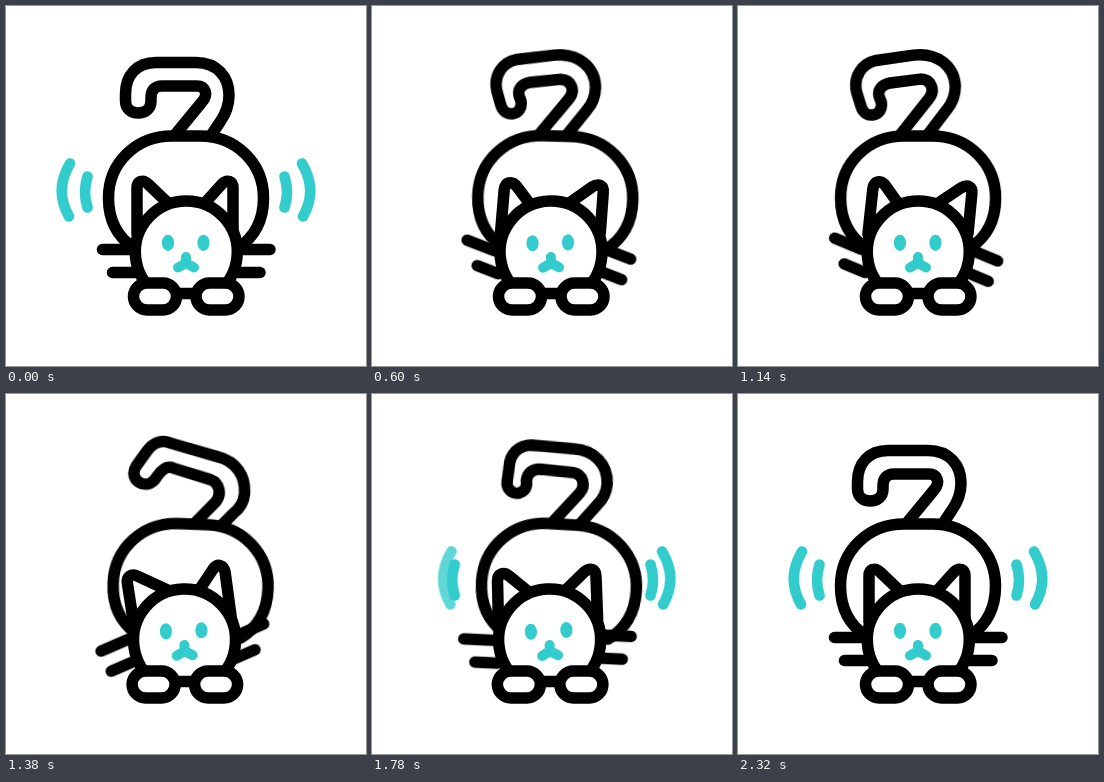
An HTML page without scripts that plays this animation: 360x360 px, repeating every 2.5 s.

```html
<!DOCTYPE html>
<html lang="en">
<head>
<meta charset="utf-8">
<title>Wiggling cat</title>
<style>
@property --sway { syntax: "<number>"; inherits: true; initial-value: 0; }

html, body { margin: 0; width: 100%; height: 100%; overflow: hidden; background: #fff; }
svg {
  display: block; width: 100%; height: 100%;
  fill: none; stroke: #000; stroke-width: 11.5; stroke-linecap: round; stroke-linejoin: round;
  animation: sway 2.5s ease-in-out infinite;
}

/* the rump swings, head and paws counter it */
.rump { transform-origin: 180px 312px; transform: rotate(calc(var(--sway) * 4.7deg)); }
.head { transform-origin: 180px 300px; transform: rotate(calc(var(--sway) * -4deg)); }
.paws { transform: translateX(calc(var(--sway) * -3px)); }
.solid { fill: #fff; }
.face { stroke: none; fill: #33cccc; }
.nose { stroke: #33cccc; stroke-width: 10; fill: none; }

@keyframes sway {
  0%, 7.2%, 92.8%, 100% { --sway: 0; }
  17.2%, 40%, 62.5%, 86% { --sway: -1; }
  28.6%, 51.2%, 74.4% { --sway: 1; }
}

/* tail and ears blend between neutral, back and forward shapes */
.bend { animation: bend 2.5s ease-in-out infinite; }
@keyframes bend {
  0%, 7.2%, 92.8%, 100% { d: var(--rest); }
  12.4%, 34.2%, 56%, 78.6% { d: var(--back); }
  23.2%, 45%, 65.6%, 88.6% { d: var(--fore); }
}
.tail {
  --rest: path("M168 130 L196 96 C203 88 199 80 191 80 L156 80 C149 80 145 84 145 92 L145 95 C145 111 119.5 111 119.5 95 L119.5 88 C119.5 69 131 56.5 150 56.5 L190 56.5 C211 56.5 223 71 223 89 C223 100 219 109 214 116 L206 128");
  --fore: path("M161 130 L191 92 C197 84 193 73 182 73 L152 77 C143 79 139 84 141 91 L143 96 C146 111 127 114 123 101 L118.5 87 C114.5 71 123 58 138 54.5 L175 49 C199 46 216 60 217 80 C217 90 214 97 209 103 L190 128");
  --back: path("M181 130 L202 107 C208 99 205 88 196 85 L159 75 C152 72 147 76 142 84 L140 87 C131 98 113 88 121 74 L131 59 C137 50 145 46 155 50 L203 62 C221 66 231 80 230.5 98 C230 107 226 113 220 118 L209 130");
}
.ear-l {
  --rest: path("M131 228 L131 182 C131 175 137 173 142 178 L164 199");
  --fore: path("M130 228 L135 183 C136 175 143 173 148 180 L162 200");
  --back: path("M130 228 L125 188 C124 181 129 177 136 181 L166 196");
}
.ear-r {
  --rest: path("M197 199 L216 178 C221 173 227 175 227 182 L227 228");
  --fore: path("M196 200 L223 182 C230 178 235 181 234 188 L230 228");
  --back: path("M194 200 L211 176 C216 170 222 172 223 180 L228 228");
}

.whiskers line { animation: flick 2.5s ease-in-out infinite; }
@keyframes flick {
  0%, 7.2%, 92.8%, 100% { transform: translateX(0) rotate(0); }
  12.4%, 34.2%, 56%, 78.6% { transform: translateX(-2px) rotate(-22deg); }
  23.2%, 45%, 65.6%, 88.6% { transform: translateX(-2px) rotate(23deg); }
}

/* motion arcs drift out, then pop back one after another; positive x is outward */
.arcs { stroke: #33cccc; stroke-width: 10.6; }
.arcs path { animation: 2.5s ease-out infinite; }
.arcs .in-r { animation-name: in-r; }
.arcs .out-r { animation-name: out-r; }
.arcs .in-l { animation-name: in-l; }
.arcs .out-l { animation-name: out-l; }
@keyframes in-r {
  0%, 7.2% { transform: none; opacity: 1; }
  20%, 62% { transform: translateX(21px); opacity: 0; }
  62.1% { transform: translateX(-6px); opacity: 0; }
  63.5% { opacity: 1; }
  64% { transform: translateX(2px); }
  70%, 100% { transform: none; opacity: 1; }
}
@keyframes out-r {
  0%, 7.2% { transform: none; opacity: 1; }
  20%, 66% { transform: translateX(21px); opacity: 0; }
  66.1% { transform: translateX(-20px); opacity: 0; }
  68.5% { opacity: 1; }
  76%, 100% { transform: none; opacity: 1; }
}
@keyframes in-l {
  0%, 7.2% { transform: none; opacity: 1; }
  20%, 67% { transform: translateX(21px); opacity: 0; }
  67.1% { transform: translateX(-6px); opacity: 0; }
  69% { opacity: 1; }
  74%, 100% { transform: none; opacity: 1; }
}
@keyframes out-l {
  0%, 7.2% { transform: none; opacity: 1; }
  20%, 70% { transform: translateX(21px); opacity: 0; }
  70.1% { transform: translateX(-20px); opacity: 0; }
  72% { opacity: 1; }
  78%, 100% { transform: none; opacity: 1; }
}
</style>
</head>
<body>
<svg viewBox="0 0 360 360">
  <g class="arcs">
    <path class="in-r" d="M278.5 170.5 Q283.5 186 278.5 201.5"/>
    <path class="out-r" d="M296 157.5 Q312 184.5 297 210.5"/>
    <g transform="matrix(-1 0 0 1 360 0)">
      <path class="in-l" d="M278.5 170.5 Q283.5 186 278.5 201.5"/>
      <path class="out-l" d="M296 157.5 Q312 184.5 297 210.5"/>
    </g>
  </g>

  <g class="rump">
    <path class="bend tail" d="M168 130"/>
    <path class="solid" d="M128 242 C110 230 102.5 212 102.5 192 C102.5 157 130 130 166 130 L194 130 C230 130 257.5 157 257.5 192 C257.5 212 250 230 232 242"/>
  </g>

  <g class="head">
    <g class="whiskers">
      <line x1="126" y1="243.5" x2="96.5" y2="243.5" style="transform-origin: 126px 243.5px"/>
      <line x1="129" y1="266.5" x2="106.5" y2="266.5" style="transform-origin: 129px 266.5px"/>
      <line x1="234" y1="243.5" x2="264" y2="243.5" style="transform-origin: 234px 243.5px"/>
      <line x1="231" y1="266.5" x2="254" y2="266.5" style="transform-origin: 231px 266.5px"/>
    </g>
    <path class="bend ear-l" d="M131 228"/>
    <path class="bend ear-r" d="M227 228"/>
    <path class="solid" d="M150 287 A51 51 0 1 1 210.6 287"/>
    <g class="face">
      <ellipse cx="162" cy="236.8" rx="6.1" ry="8.1"/>
      <ellipse cx="197.5" cy="236.8" rx="6.1" ry="8.1"/>
      <path class="nose" d="M180 251 V257 L172 261.5 M180 257 L188 261.5"/>
    </g>
  </g>

  <g class="paws">
    <path d="M172 287.5 H188"/>
    <rect class="solid" x="127.5" y="277" width="43" height="27" rx="13.5"/>
    <rect class="solid" x="190" y="277" width="43" height="27" rx="13.5"/>
  </g>
</svg>
</body>
</html>
```
